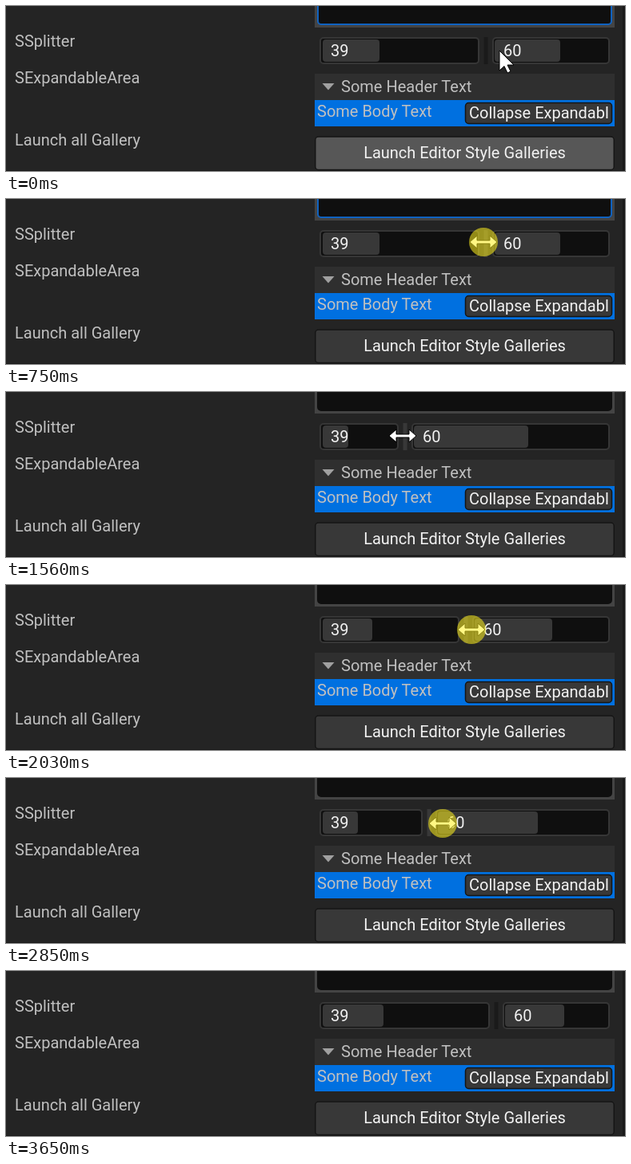
An HTML page for the animation above (3780 ms loop, 774 px wide and 207 px high).

```html
<!DOCTYPE html>
<html lang="en">
<head>
<meta charset="utf-8">
<title>Widget gallery</title>
<style>
  html, body { margin: 0; width: 100%; height: 100%; overflow: hidden; background: #242424; }
  svg { display: block; width: 774px; height: 207px; }
  text { font: 20px Roboto, sans-serif; fill: #c0c0c0; white-space: pre; }
  .bright { fill: #f2f2f2; }
  .field { fill: #0f0f0f; stroke: #363636; stroke-width: 2; }
  .button { fill: #383838; stroke: #151515; stroke-width: 1.5; }
  .value { fill: #383838; }
  .pointer { fill: #fff; stroke: #000; stroke-width: 1; }
</style>
</head>
<body>
<svg viewBox="0 0 774 207">
  <rect x="771" width="3" height="207" fill="#1a1a1a"/>
  <rect y="206" width="774" height="1" fill="#1a1a1a"/>

  <text x="11" y="51">SSplitter</text>
  <text x="11" y="97">SExpandableArea</text>
  <text x="11" y="175">Launch all Gallery</text>

  <rect x="386" y="-20" width="375" height="47" fill="#444"/>
  <rect id="focusBox" x="390" y="-20" width="367" height="43" rx="4" fill="#0f0f0f" stroke-width="2"/>

  <rect id="leftField" class="field" x="393" y="40" height="32" rx="4"/>
  <rect id="leftValue" class="value" x="396" y="42" height="28" rx="4"/>
  <text class="bright" x="406" y="63">39</text>
  <rect id="handle" y="39" width="5" height="34"/>
  <rect id="rightField" class="field" y="40" height="32" rx="4"/>
  <rect id="rightValue" class="value" y="42" height="28" rx="4"/>
  <text id="rightText" class="bright" y="63">60</text>

  <rect x="386" y="85" width="375" height="33" fill="#2f2f2f"/>
  <path d="M395.500 97h15l-7.500 8.500z" fill="#a0a0a0"/>
  <text x="419" y="108">Some Header Text</text>
  <rect x="386" y="118" width="375" height="33" fill="#0070e0"/>
  <text x="389" y="139">Some Body Text</text>
  <rect class="button" x="574.500" y="121.500" width="183" height="26" rx="4"/>
  <text class="bright" x="579" y="141">Collapse Expandabl</text>

  <rect id="launch" class="button" x="386.750" y="164" width="373.500" height="41.500" rx="4"/>
  <text class="bright" x="573.500" y="191" text-anchor="middle">Launch Editor Style Galleries</text>

  <g id="cursor">
    <path id="arrow" class="pointer" d="M0 0V25L6 19.500L10 28L14 26L10 18H18Z"/>
    <path id="resize" class="pointer" d="M-17 0L-8 -8V-2H8V-8L17 0L8 8V2H-8V8Z"/>
    <circle id="press" r="18" fill="#fff01e" fill-opacity=".55"/>
  </g>
</svg>
<script>
  const LOOP = 3780, STEP = 67.59;
  const $ = id => document.getElementById(id);
  const set = (id, attrs) => {
    for (const name in attrs) $(id).setAttribute(name, attrs[name]);
  };
  const show = (id, on) => set(id, { visibility: on ? 'visible' : 'hidden' });

  // Cursor stops: step, x, y
  const stops = [
    [0, 617, 56], [8, 597, 54], [11, 597, 54], [19.5, 496, 55], [27.5, 496, 55],
    [32.6, 674, 57], [34, 677, 58], [35, 677, 58], [36.2, 677, 61],
    [40.85, 467, 54], [43, 610, 59], [44, 614, 59], [51, 614, 59], [53, 640, 165], [56, 640, 230]
  ];

  function cursorAt(step) {
    const next = Math.max(1, stops.findIndex(s => s[0] > step));
    const [t0, x0, y0] = stops[next - 1], [t1, x1, y1] = stops[next];
    const p = (step - t0) / (t1 - t0), e = p * p * (3 - 2 * p);
    return [Math.round(x0 + (x1 - x0) * e), Math.round(y0 + (y1 - y0) * e)];
  }

  function drawSplitter(center, hovered) {
    const right = center + 9;
    set('handle', { x: center - 2.5, fill: hovered ? '#383838' : '#1a1a1a' });
    set('leftField', { width: center - 402 });
    set('leftValue', { width: Math.round(0.387 * center + 235.2) - 396 });
    set('rightField', { x: right, width: 754 - right });
    set('rightValue', { x: right + 2, width: Math.round(0.393 * center + 457.2) - right - 2 });
    set('rightText', { x: center + 22 });
  }

  function draw(time) {
    const step = Math.floor((time % LOOP) / STEP);
    const [x, y] = cursorAt(step);
    const resizing = x < 608 && step < 11 || step >= 11 && step < 52;
    const pressed = step >= 11 && step < 23 || step >= 27 && step < 47;
    const visible = step < 54;

    // The splitter trails the pointer slightly while dragged
    const dragStep = Math.min(43, Math.max(11, step - 0.2));
    drawSplitter(cursorAt(dragStep)[0] + 3, resizing);

    set('cursor', { transform: `translate(${x} ${y})` });
    show('arrow', visible && !resizing);
    show('resize', visible && resizing);
    show('press', pressed);
    set('focusBox', { stroke: step < 12 ? '#0f62c0' : '#0f0f0f' });
    $('launch').style.fill = step === 0 || step === 53 ? '#575757' : '#383838';
  }

  const start = performance.now();
  function tick() {
    draw(performance.now() - start);
    requestAnimationFrame(tick);
  }
  tick();
</script>
</body>
</html>
```
